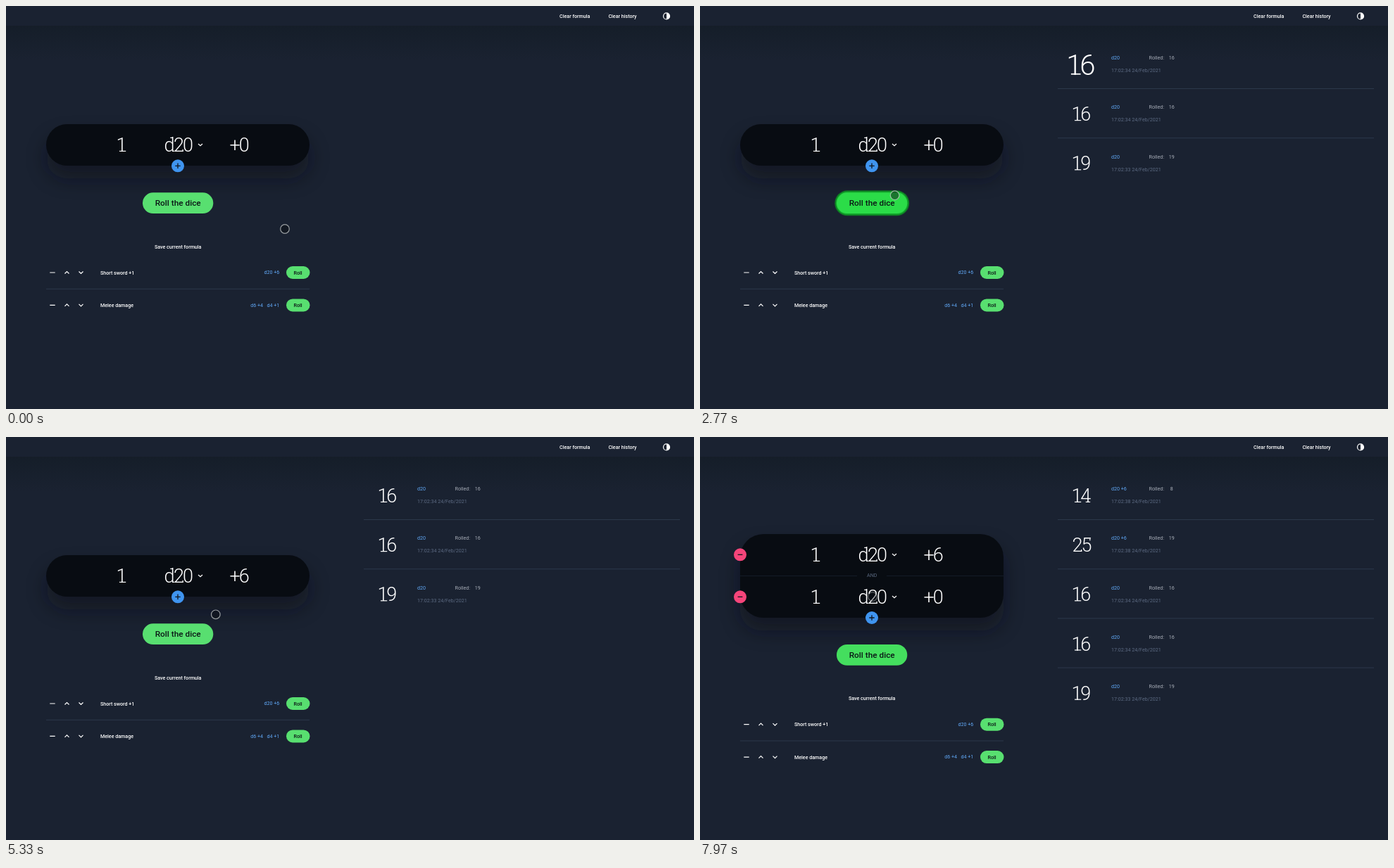
An HTML page for the animation above (8 s loop, 977x573 px).

```html
<!DOCTYPE html>
<html lang="en">
<head>
<meta charset="utf-8">
<title>Dice roller</title>
<style>
html, body { margin: 0; width: 100%; height: 100%; overflow: hidden; background: #1a2231; }
svg { display: block; width: 100vw; height: 100vh; }
text { font: 500 7.12px Roboto, sans-serif; fill: #fff; }
.mid { text-anchor: middle; }
.big text { font-size: 27px; font-weight: 300; text-anchor: middle; }
.line { fill: none; stroke: #fff; stroke-width: 1.2; }
.blue { fill: #61a9f8; font-weight: 400; }
.grey { fill: #a9afb9; font-weight: 400; }
.dim { fill: #5c6a82; font-weight: 400; }
.rule { stroke: #2c384a; stroke-width: 1; }
.dark { fill: none; stroke: #10151d; stroke-width: 1.3; }
</style>
</head>
<body>
<svg viewBox="0 0 977 573" preserveAspectRatio="none">
  <defs>
    <linearGradient id="fade" x2="0" y2="1">
      <stop offset="0" stop-color="#121b24" stop-opacity=".62"/>
      <stop offset=".45" stop-color="#121b24" stop-opacity=".34"/>
      <stop offset="1" stop-color="#121b24" stop-opacity="0"/>
    </linearGradient>
    <filter id="soft" x="-30%" y="-100%" width="160%" height="300%"><feGaussianBlur stdDeviation="14"/></filter>
  </defs>
  <rect width="977" height="573" fill="#1a2231"/>
  <rect y="28" width="977" height="50" fill="url(#fade)"/>
  <g id="stage"></g>
</svg>
<script>
const LOOP = 8000, ADD = 7700, FIELD = 3330, ROW = 70.2;

const ROLLS = [
  { at: 1400, total: '19', dice: 'd20', rolled: 19, time: '17:02:33' },
  { at: 1810, total: '16', dice: 'd20', rolled: 16, time: '17:02:34' },
  { at: 2430, total: '16', dice: 'd20', rolled: 16, time: '17:02:34' },
  { at: 5780, total: '25', dice: 'd20 +6', rolled: 19, time: '17:02:38' },
  { at: 6320, total: '14', dice: 'd20 +6', rolled: 8, time: '17:02:38' }
];

// Pointer stops: time, x, y
const PATH = [
  [250, 396, 317], [1080, 265, 276], [2650, 265, 276], [3250, 375, 212],
  [4950, 375, 212], [5560, 262, 271], [7050, 262, 271], [7520, 245, 227]
];

// Slab details for the light numerals, relative to glyph centre and baseline
const SERIFS = {
  1: 'M-4 -.6H5.2',
  2: 'M5.6 -.6V-3.2',
  4: 'M0 -.6H6.4',
  5: 'M4.8 -18.6V-16',
  d: 'M1.3 -19.6H4.6M4.6 -.6H7.6'
};
const ADVANCE = { 1: 10.5, d: 14, '+': 13.5 };
const advance = c => ADVANCE[c] || 13;

const text = (x, y, s, cls = '') => `<text x="${x}" y="${y}" class="${cls}">${s}</text>`;
const path = (d, cls = 'line') => `<path d="${d}" class="${cls}"/>`;
const pill = (x, y, w, h, fill, more = '') =>
  `<rect x="${x}" y="${y}" width="${w}" height="${h}" rx="${Math.min(h / 2, 33)}" fill="${fill}" ${more}/>`;
const group = (id, body, more = '') => `<g id="${id}" ${more}>${body}</g>`;

function big(s, cx, base) {
  const width = [...s].reduce((sum, c) => sum + advance(c), 0);
  let x = cx - width / 2, out = '';
  for (const c of s) {
    const mid = x + advance(c) / 2;
    out += text(c === '1' ? mid - 1 : mid, base, c);
    if (SERIFS[c]) out += `<path d="${SERIFS[c]}" class="line" transform="translate(${mid} ${base})"/>`;
    x += advance(c);
  }
  return `<g class="big">${out}</g>`;
}

const formula = mod =>
  big('1', 165, 207) + big('d20', 245, 207) + path('M273 196l3 2.8 3-2.8') +
  group(mod, big('+0', 331.5, 207));

const badge = y =>
  `<circle cx="57" cy="${y}" r="9" fill="#f5457a"/>` + path(`M53.6 ${y}h6.8`, 'dark');

const saved = (y, name, dice) =>
  path(`M62.3 ${y}h7.4M83.5 ${y + 1.5}l3-3 3 3M103.5 ${y - 1.5}l3 3 3-3`) +
  text(134, y + 2.5, name) + dice +
  pill(398, y - 9, 33.5, 18, '#58df70') +
  `<text x="414.6" y="${y + 2.5}" class="mid" style="fill:#0d1a18">Roll</text>`;

const result = (r, i) => group('roll' + i,
  group('total' + i, big(r.total, 542.5, 93)) +
  text(584, 76.2, r.dice, 'blue') + text(637.5, 76.2, 'Rolled:', 'grey') +
  text(669.8, 76.2, r.rolled, 'grey mid') +
  text(584, 94.2, r.time + ' 24/Feb/2021', 'dim') +
  (i ? path('M508 117.5H957', 'rule') : ''));

const $ = id => document.getElementById(id);
const set = (id, attrs) => { for (const k in attrs) $(id).setAttribute(k, attrs[k]); };
const show = (id, on) => set(id, { visibility: on ? 'visible' : 'hidden' });

$('stage').innerHTML =
  text(786, 17, 'Clear formula') + text(855.4, 17, 'Clear history') +
  '<circle cx="938" cy="14.4" r="4.5" class="line"/><path d="M938 9.9a4.5 4.5 0 0 1 0 9z" fill="#fff"/>' +
  pill(57, 186, 374, 59, '#0a1016', 'id="shade" opacity=".5" filter="url(#soft)"') +
  pill(57, 168, 374, 59, '#080c12', 'id="panel"') +
  group('field', '<path d="M306.5 168H401.5a29.5 29.5 0 0 1 0 59H306.5z" fill="#0a0e15"/>') +
  group('first', formula('mod')) +
  path('M346 182V213', 'line" id="caret') +
  group('second',
    '<g transform="translate(0 30)">' + formula('mod2') + '</g>' +
    path('M57 197.5H223M265 197.5H431', 'line" style="stroke:#131b27') +
    text(244.2, 199.3, 'AND', 'dim mid') + badge(167.3) + badge(227.3)) +
  group('lower',
    '<circle cx="244" cy="227.3" r="9" fill="#3f94ef"/>' + path('M240.3 227.3h7.4M244 223.6v7.4', 'dark') +
    group('ring', pill(191.3, 262.3, 105.9, 36, '#0e7a24') + pill(192.8, 263.8, 102.9, 33, '#12a52a')) +
    pill(194, 265.3, 100.3, 29.8, '#58df70', 'id="button"') +
    '<text x="244.2" y="284.4" class="mid" style="font-size:11.8px;fill:#0b1716">Roll the dice</text>' +
    text(244.2, 344.6, 'Save current formula', 'mid') +
    saved(379, 'Short sword +1', text(366.4, 381.2, 'd20 +6', 'blue')) +
    path('M57 402.3H431', 'rule') +
    saved(425.4, 'Melee damage', text(347.2, 427.6, 'd6 +4', 'blue') + text(370.4, 427.6, 'd4 +1', 'blue'))) +
  ROLLS.map(result).join('') +
  '<circle id="pointer" r="6.3" fill="#0a0e14" fill-opacity=".5" stroke="#c4c8c8" stroke-opacity=".75" stroke-width="1.2"/>';

const clamp = v => Math.max(0, Math.min(1, v));
const ramp = (t, from, length) => clamp((t - from) / length);
const ease = p => p * p * (3 - 2 * p);
const mix = (a, b, p) => a + (b - a) * p;

function pointerAt(t) {
  const i = PATH.findIndex(k => k[0] > t);
  if (i === 0) return PATH[0].slice(1);
  if (i < 0) return PATH[PATH.length - 1].slice(1);
  const [t0, x0, y0] = PATH[i - 1], [t1, x1, y1] = PATH[i];
  const p = ease((t - t0) / (t1 - t0));
  return [mix(x0, x1, p), mix(y0, y1, p)];
}

// Button focus is gained by a press and fades when the focus moves away
const focus = (t, fade) =>
  t < 4500 ? ramp(t, 1290, 60) - ramp(t, FIELD, fade)
           : ramp(t, 5660, 60) - ramp(t, ADD, fade);

function drawButton(t) {
  const hold = Math.max(...ROLLS.map(r => ramp(t, r.at - 240, 50) - ramp(t, r.at, 90)));
  const lit = clamp(focus(t, t < 4500 ? 250 : 400) * 1.4) * (1 - clamp(hold));
  const rgb = [mix(88, 43, lit), mix(223, 220, lit), mix(112, 72, lit)].map(Math.round);
  set('button', { fill: `rgb(${rgb})` });
  set('ring', { opacity: clamp(focus(t, 160)) });
}

let modText = '+0';
function drawField(t) {
  const s = t < 3900 ? '+0' : t < 4300 ? '+' : '+6';
  if (s !== modText) $('mod').innerHTML = big(modText = s, 331.5, 207);
  const active = t >= FIELD && t < 5000;
  const x = s === '+' ? 339 : 346;
  show('field', active);
  show('caret', active && (t - FIELD) % 1000 < 500);
  set('caret', { d: `M${x} 182V213` });
}

function drawRolls(t) {
  const count = ROLLS.filter(r => t >= r.at).length;
  ROLLS.forEach((r, i) => {
    const zoom = 1 + 0.58 * Math.sin(Math.PI * ramp(t, r.at, 500));
    show('roll' + i, i < count);
    set('roll' + i, { transform: `translate(0 ${ROW * Math.max(0, count - 1 - i)})` });
    set('total' + i, { transform: `translate(542.5 83.5) scale(${zoom}) translate(-542.5 -83.5)` });
  });
}

function draw(t) {
  const added = t >= ADD, d = added ? 30 : 0;
  set('panel', { y: 168 - d, height: 59 + 2 * d, rx: added ? 33 : 29.5 });
  set('shade', { y: 186 - d, height: 59 + 2 * d });
  set('first', { transform: `translate(0 ${-d})` });
  set('lower', { transform: `translate(0 ${d ? 29.7 : 0})` });
  show('second', added);
  drawButton(t);
  drawField(t);
  drawRolls(t);
  const [cx, cy] = pointerAt(t);
  set('pointer', { cx, cy, opacity: added ? 0.6 : 1 });
}

const start = performance.now();
function tick() {
  draw((performance.now() - start) % LOOP);
  requestAnimationFrame(tick);
}
tick();
</script>
</body>
</html>
```
